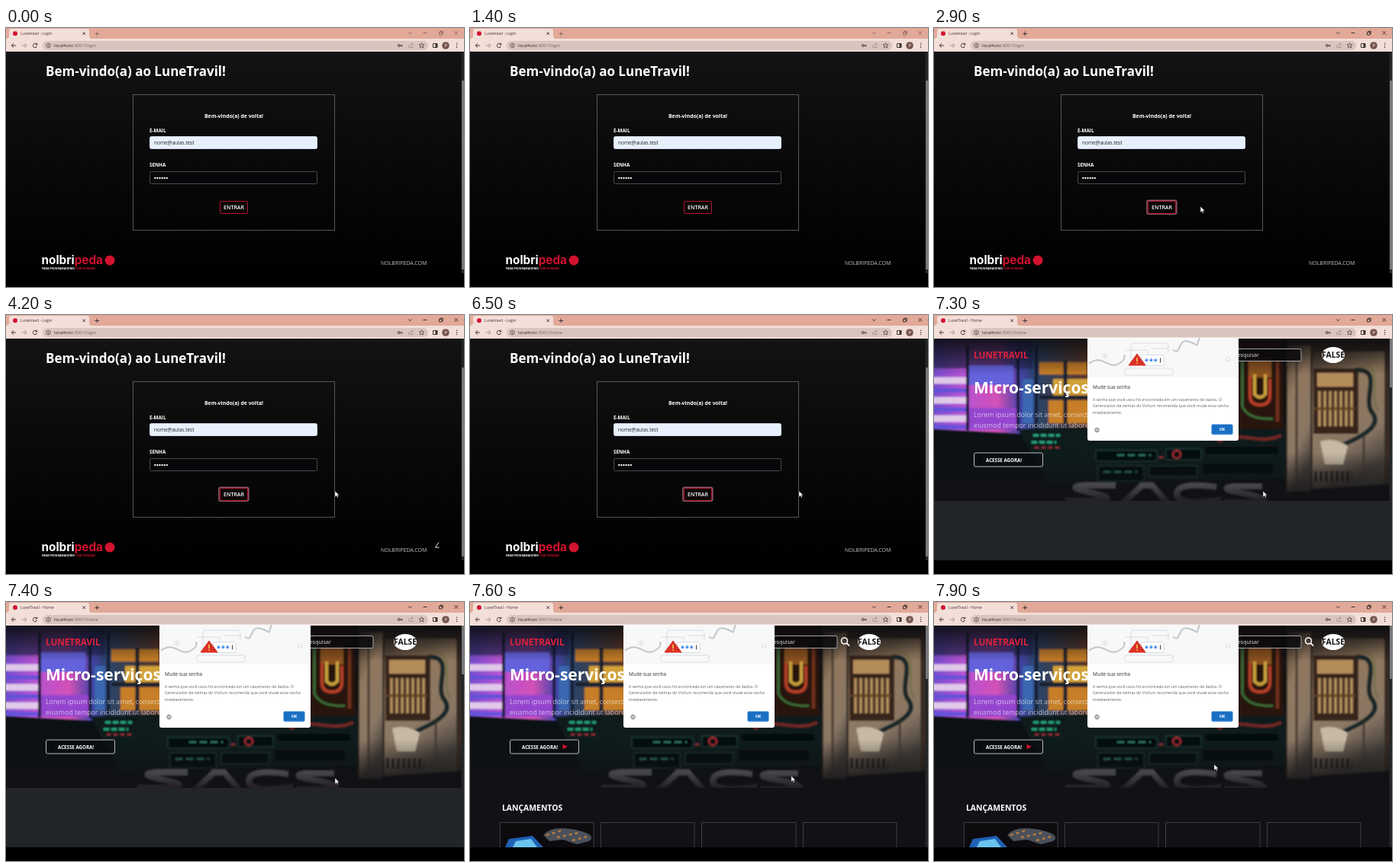
Animation of 600x340 px, one loop 8 s. Source, as an HTML page:

```html
<!DOCTYPE html>
<html lang="pt">
<head>
<meta charset="utf-8">
<title>Login</title>
<style>
  html, body { margin: 0; width: 100%; height: 100%; overflow: hidden; background: #000; }
  svg { display: block; width: 600px; height: 340px; }
  text { font-family: "Open Sans", "Noto Sans", sans-serif; fill: #fff; }
  .bold { font-weight: 700; }
  .mid { text-anchor: middle; }
  .line { fill: none; stroke: #3c3331; stroke-width: 1; }
  .art { fill: none; stroke: #dadce0; stroke-width: 1; }
  .cable { fill: none; stroke-width: 4; }
  .note { font-size: 5.2px; fill: #5f6368; }
</style>
</head>
<body>
<svg viewBox="0 0 600 340">
  <defs>
    <linearGradient id="night" x2="0" y2="1">
      <stop stop-color="#131315"/><stop offset=".45" stop-color="#0a0a0b"/><stop offset="1" stop-color="#000"/>
    </linearGradient>
    <linearGradient id="neon">
      <stop stop-color="#7a52e0"/><stop offset=".2" stop-color="#c75be8"/><stop offset=".42" stop-color="#e658c8"/>
      <stop offset=".56" stop-color="#4b48b8"/><stop offset=".66" stop-color="#2c4a72"/><stop offset="1" stop-color="#6b3a28"/>
    </linearGradient>
    <linearGradient id="metal" x2=".3" y2="1">
      <stop stop-color="#4a3a30"/><stop offset=".35" stop-color="#a08468"/><stop offset=".75" stop-color="#94806c"/><stop offset="1" stop-color="#4b443f"/>
    </linearGradient>
    <linearGradient id="shade" x2="0" y2="1">
      <stop stop-color="#08090b" stop-opacity=".85"/><stop offset=".22" stop-color="#08090b" stop-opacity=".1"/>
      <stop offset=".7" stop-color="#111214" stop-opacity=".08"/><stop offset="1" stop-color="#131115" stop-opacity=".9"/>
    </linearGradient>
    <filter id="slight" x="-5%" y="-5%" width="110%" height="110%"><feGaussianBlur stdDeviation="1"/></filter>
    <clipPath id="heroClip"><rect y="31" width="600" height="213"/></clipPath>
    <clipPath id="pageClip"><rect y="31" width="600" height="291"/></clipPath>
  </defs>

  <g id="login">
    <rect y="31" width="600" height="291" fill="url(#night)"/>
    <text class="bold" x="52" y="63" font-size="17">Bem-vindo(a) ao LuneTravil!</text>
    <rect x="166.5" y="87.5" width="264" height="178" fill="none" stroke="#55565a"/>
    <text class="bold mid" x="298.5" y="118" font-size="6.9">Bem-vindo(a) de volta!</text>
    <text class="bold" x="188" y="136.5" font-size="6.3">E-MAIL</text>
    <rect x="188.5" y="142.5" width="219" height="16" rx="2" fill="#e8f0fe" stroke="#cdd5e4"/>
    <text x="194" y="153" font-size="6.5" style="fill:#222">nome@aulas.test</text>
    <text class="bold" x="188" y="182" font-size="6.3">SENHA</text>
    <rect x="188.5" y="188.5" width="219" height="16" rx="2" fill="#08080a" stroke="#4a4b50"/>
    <path d="M195.3 197H213" stroke="#fff" stroke-width="2.3" stroke-linecap="round" stroke-dasharray="0 3.1"/>
    <rect id="focusRing" x="278.8" y="226.3" width="39" height="18" rx="2.5" fill="none" stroke="#8c5a66" stroke-width="1.5"/>
    <rect x="280.5" y="227.5" width="36" height="16" rx="1.5" fill="#0b0608" stroke="#b3152f"/>
    <text class="mid" x="298.5" y="238" font-size="7" font-weight="600">ENTRAR</text>
    <text class="bold" x="46.5" y="310" font-size="15.3" style="font-family:Inter,sans-serif">nolbri<tspan fill="#d3122f">peda</tspan></text>
    <circle cx="136" cy="305" r="6.5" fill="#d3122f"/>
    <text class="bold" x="47" y="316.5" font-size="3.6">PARA PROGRAMADORES <tspan fill="#d3122f">COM OUSADIA</tspan></text>
    <text x="491" y="310.5" font-size="7" style="fill:#c4c4c6">NOLBRIPEDA.COM</text>
    <rect x="596.5" y="31" width="3.5" height="291" fill="#242527"/>
    <rect x="597" y="69" width="3" height="248" fill="#77787b"/>
    <g id="building"><path d="M567 298.5L562.5 305.2H571.3Z" fill="none" stroke="#fff" stroke-width=".9" pathLength="100" stroke-dasharray="100"/></g>
  </g>

  <g id="loading">
    <rect y="31" width="600" height="291" fill="#212529"/>
    <path id="spinner" d="M303.6 172.4A6.4 6.4 0 1 0 303.6 181.6" fill="none" stroke="#fff" stroke-width="1.8"/>
  </g>

  <g id="home" clip-path="url(#pageClip)">
    <rect y="31" width="600" height="291" fill="#212529"/>
    <g clip-path="url(#heroClip)">
      <rect y="31" width="600" height="213" fill="#0b1114"/>
      <g filter="url(#slight)">
        <!-- neon rack -->
        <path d="M-5 31H205V148L110 156L-5 150Z" fill="url(#neon)"/>
        <path d="M-5 31H130V70H-5Z" fill="#262a5c" opacity=".65"/>
        <path d="M-5 86H42M-5 112H42M-5 136H42" stroke="#f6dcff" stroke-width="9"/>
        <path d="M-5 99H42M-5 124H42M-5 147H42" stroke="#6a58ee" stroke-width="5"/>
        <path d="M46 66H104V92H46Z" fill="#6d6cf2"/>
        <path d="M46 122H108V150H46Z" fill="#a14be0"/>
        <path d="M44 40V152M110 45V152M134 40V150" stroke="#191a38" stroke-width="4"/>
        <path d="M138 62H200V78H138ZM150 112H205V142H150Z" fill="#d98a2c"/>
        <path d="M156 84H205V106H156Z" fill="#e8b23c"/>
        <path d="M116 84H130V142H116Z" fill="#3f6fc0"/>
        <path d="M138 108H205M172 60V148" stroke="#1d2331" stroke-width="5"/>
        <!-- board slots -->
        <path d="M110 150L460 140V215L150 222Z" fill="#0d1a1e"/>
        <path d="M130 158H165M128 167H160" stroke="#2fc18e" stroke-width="3" stroke-dasharray="7 3"/>
        <path d="M132 174H168M250 187H330" stroke="#a8343c" stroke-width="2" stroke-dasharray="5 4"/>
        <path d="M212 178H292V192H212ZM215 198H275V218H215ZM282 198H345V212H282ZM304 176H350V190H304Z" fill="#05080a" stroke="#28564d"/>
        <path d="M222 206H266M240 184H284" stroke="#35896f" stroke-width="2" stroke-dasharray="9 5"/>
        <circle cx="318" cy="183" r="5" fill="none" stroke="#c23540" stroke-width="2"/>
        <path d="M355 172H452V184H355ZM352 194H445V210H352Z" fill="#05070a" stroke="#252c30"/>
        <path class="cable" d="M372 166C400 150 425 172 455 158" stroke="#7c2c28"/>
        <!-- loose cables -->
        <path d="M396 31H458V150H396Z" fill="#29140f"/>
        <path d="M412 58H442V82H412Z" fill="#9a5a20"/>
        <path class="cable" d="M414 80V106Q414 118 427 118T440 106V84" stroke="#c8452a"/>
        <path class="cable" d="M420 78V104Q427 112 434 104V78" stroke="#e0b043"/>
        <path class="cable" d="M404 50V120Q412 138 444 136" stroke="#3f7a3c" style="stroke-width:3"/>
        <path class="cable" d="M450 60V140" stroke="#7b351f"/>
        <!-- metal case -->
        <path d="M461 31H600V222L461 232Z" fill="#3a2e28"/>
        <path d="M463 40H493V232H463Z" fill="url(#metal)"/>
        <path d="M496 48H590V222L496 228Z" fill="url(#metal)"/>
        <path d="M497 70H556V156H497Z" fill="#3b281b"/>
        <path d="M502 76H549V94H502Z" fill="#c79a63"/>
        <path d="M505 100V146M512 100V146M519 100V146M526 100V146M533 100V146M540 100V146M547 100V146" stroke="#c9a06a" stroke-width="3.5"/>
        <path d="M498 123H552" stroke="#6a4524" stroke-width="3"/>
        <path class="cable" d="M552 72C590 70 560 110 574 128S560 160 532 172" stroke="#1d2b2b" style="stroke-width:6"/>
        <path class="cable" d="M558 66C592 64 568 108 582 126" stroke="#75794a" style="stroke-width:2"/>
        <path d="M506 166Q524 160 542 172L536 196H512Z" fill="#d8c8b2"/>
        <path d="M498 212H548" stroke="#2c2724" stroke-width="14" stroke-dasharray="4 3"/>
        <path d="M475 50V222M563 160V215" stroke="#4d4036" stroke-width="3"/>
        <!-- floor lettering, flattened by perspective -->
        <path d="M238 224H198Q170 226 204 233T222 244H172M248 247L272 224H286L306 247M370 226Q318 219 318 235T376 243M430 225H392Q370 228 404 234T432 246H380" fill="none" stroke="#a3a3a5" stroke-width="8"/>
      </g>
      <rect y="31" width="600" height="213" fill="url(#shade)"/>
    </g>
    <text class="bold" x="52" y="57" font-size="11.7" style="fill:#e0203a">LUNETRAVIL</text>
    <text class="bold" x="52" y="103" font-size="21">Micro-serviços</text>
    <g font-size="8.8" opacity=".65">
      <text x="52" y="134">Lorem ipsum dolor sit amet, consect</text>
      <text x="52" y="148">eiusmod tempor incididunt ut labore</text>
    </g>
    <rect x="52.5" y="181" width="90" height="18" rx="2" fill="#090a0c" fill-opacity=".6" stroke="#d0d0d2" stroke-width=".9"/>
    <text class="bold" x="68" y="192.6" font-size="6.2">ACESSE AGORA!</text>
    <rect x="380.5" y="44.5" width="100.5" height="16" rx="2" fill="#0a0a0c" fill-opacity=".8" stroke="#b4b4b8" stroke-width=".9"/>
    <text x="393.5" y="55" font-size="7.1" style="fill:#ddd">Pesquisar</text>
    <ellipse cx="523" cy="52.5" rx="15" ry="10.5" fill="#fff"/>
    <text class="bold mid" x="523" y="56.3" font-size="10.3" style="fill:#101113">FALSE</text>
    <g id="icons">
      <path d="M121.5 186.8L128 190L121.5 193.2Z" fill="#d3122f"/>
      <circle cx="490.5" cy="51" r="4" fill="none" stroke="#fff" stroke-width="1.6"/>
      <path d="M493.4 54L497 57.6" stroke="#fff" stroke-width="1.8"/>
    </g>
    <g id="releases">
      <rect y="244" width="600" height="78" fill="#131115"/>
      <text class="bold" x="42" y="274" font-size="10.4">LANÇAMENTOS</text>
      <path d="M40 290H162V322H40Z" fill="#0d0b0e"/>
      <path d="M46 322L51 311L82 307L96 322Z" fill="#1f62b4"/>
      <path d="M56 322L60 314L80 311L88 322Z" fill="#69c3ee"/>
      <path d="M96 306Q104 296 122 297T152 303T156 314L140 318L122 312L104 314Z" fill="#4a505a"/>
      <path d="M100 306L120 300M114 309L142 303M134 313L153 308" stroke="#b5793f" stroke-width="2.5" stroke-dasharray="4 4"/>
      <path d="M39.5 330V289.5H162V330M171.5 330V289.5H294V330M303.5 330V289.5H427V330M436.5 330V289.5H559V330" fill="none" stroke="#3e3d41"/>
    </g>
    <rect x="596.5" y="31" width="3.5" height="291" fill="#242527"/>
    <rect id="thumb" x="597" y="31" width="3" fill="#77787b"/>
  </g>

  <g id="browser">
    <rect width="600" height="16" fill="#e2a898"/>
    <path d="M0 14Q4 14 4 10V4Q4 1 7 1H106Q109 1 109 4V10Q109 14 113 14H600V31H0Z" fill="#f3ded8"/>
    <circle cx="12" cy="7.3" r="3" fill="#d3122f"/>
    <text id="tabTitle" x="19" y="9.4" font-size="5.2" style="fill:#3c3331"></text>
    <path class="line" d="M100.5 5.5L104 9M104 5.5L100.5 9"/>
    <path id="windowIcons" class="line" d="M116.5 7.5H122M119.2 4.7V10.2M527 5.5L529.2 7.8L531.4 5.5M546.5 6.5H551.5M567.5 5.5H571V9H567.5ZM568.8 5.3V4.2H572.3V7.7H571M587.5 4.2L592 8.7M592 4.2L587.5 8.7"/>
    <path class="line" d="M13 23H7.5M10 20.2L7.2 23L10 25.8"/>
    <path class="line" d="M21 23H26.5M24 20.2L26.8 23L24 25.8" style="stroke:#a9958f"/>
    <path class="line" d="M40 21.2A2.7 2.7 0 1 0 40.6 23.8M40.7 19.8V22H38.5"/>
    <rect x="48" y="17" width="505" height="12" rx="6" fill="#d9c4be"/>
    <circle class="line" cx="55.5" cy="23" r="2.7" style="stroke-width:.7"/>
    <path class="line" d="M55.5 22.6V24.6M55.5 21.2V21.9" style="stroke-width:.8"/>
    <text x="63" y="25.1" font-size="5.9" style="fill:#2c2624">localhost<tspan fill="#75655f">:3001/<tspan id="route"></tspan></tspan></text>
    <circle class="line" cx="514.8" cy="23" r="1.4"/>
    <path class="line" d="M516.2 23H519.5M518.6 23V24.6"/>
    <path class="line" d="M528 22V25.5H533V23.5M529.5 23.5Q530 21 533 20.8M531.6 19.5L533.2 20.8L531.6 22.2" style="stroke:#95827c;stroke-width:.7"/>
    <path class="line" d="M544.5 19.8L545.5 22H547.8L546 23.6L546.7 26L544.5 24.7L542.3 26L543 23.6L541.2 22H543.5Z" style="stroke-width:.7"/>
    <path class="line" d="M559.5 20.5H565V25.5H559.5Z"/>
    <rect x="562.5" y="20.5" width="2.5" height="5" fill="#3c3331"/>
    <circle cx="576" cy="23" r="4.8" fill="#77564d"/>
    <text class="mid" x="576" y="25" font-size="5.4">P</text>
    <path d="M590.5 20.3V26" stroke="#3c3331" stroke-width="1.5" stroke-linecap="round" stroke-dasharray="0 2.6"/>
  </g>

  <g id="dialog">
    <path d="M201 30H399V162Q399 165 396 165H204Q201 165 201 162Z" fill="#fff"/>
    <path d="M201 30H399V82H201Z" fill="#f8f8f9"/>
    <path class="art" d="M203 64C220 50 228 72 242 64S245 52 251 54" style="stroke:#c4c6ca;stroke-width:2"/>
    <path class="art" d="M313 46C325 54 318 30 334 35S342 44 348 30" style="stroke:#c4c6ca;stroke-width:2"/>
    <path class="art" d="M258 70V40Q258 37 261 37H304Q307 37 307 40V50M251 46H280V55M250 77V70H313V77Q313 79 310 79H253Q250 79 250 77M285 44H307"/>
    <path class="art" d="M224 49V58M220 51L228 56M228 51L220 56M382 58Q383 54 386 56Q389 57 388 60H382Z"/>
    <rect class="art" x="271.5" y="52.5" width="30" height="14" rx="2" style="fill:#fff"/>
    <path d="M266 51L277 66H255Z" fill="#d93025" stroke="#d93025" stroke-linejoin="round"/>
    <path d="M266 56V61M266 62.6V64" stroke="#fdd663" stroke-width="1.5"/>
    <text class="bold" x="276" y="64" font-size="9" style="fill:#1a73e8" letter-spacing="1">***</text>
    <path d="M296.5 56.5V62.5" stroke="#3c4043"/>
    <text x="208" y="97" font-size="6.4" style="fill:#303134">Mude sua senha</text>
    <text class="note" x="208" y="112.5">A senha que você usou foi encontrada em um vazamento de dados. O</text>
    <text class="note" x="208" y="121.3">Gerenciador de senhas do Vorlum recomenda que você mude essa senha</text>
    <text class="note" x="208" y="130">imediatamente.</text>
    <circle class="line" cx="213.5" cy="151" r="2.6" style="stroke-width:.8"/>
    <path class="line" d="M213.5 150.6V152.6M213.5 149.2V149.9" style="stroke-width:.8"/>
    <rect x="363.5" y="143.5" width="28" height="13.5" rx="2" fill="#1a6fc4" stroke="#8ebcec"/>
    <text class="mid bold" x="377.5" y="152.2" font-size="5.3">OK</text>
  </g>

  <rect y="322" width="600" height="18" fill="#000"/>
  <path id="cursor" d="M0 0V8L1.9 6.2L3.2 8.8L4.4 8.2L3.2 5.8H5.6Z" fill="#fff" stroke="#111" stroke-width=".4"/>
</svg>
<script>
const LOOP = 8000;
const pointer = [[1700, 560, 236], [2200, 304, 236], [2700, 304, 236], [3200, 431, 231], [7500, 431, 231], [7900, 367, 213]];
const el = id => document.getElementById(id);
const show = (id, on) => el(id).style.display = on ? "" : "none";
const ramp = (t, from, to) => Math.min(1, Math.max(0, (t - from) / (to - from)));
const smooth = p => p * p * (3 - 2 * p);

function pointerAt(t) {
  let [, x, y] = pointer[0];
  for (let i = 1; i < pointer.length; i++) {
    const [from, x0, y0] = pointer[i - 1], [to, x1, y1] = pointer[i];
    const p = smooth(ramp(t, from, to));
    if (t >= from) { x = x0 + (x1 - x0) * p; y = y0 + (y1 - y0) * p; }
  }
  return `translate(${x} ${y})`;
}

function draw(t) {
  const home = t >= 7200, loading = t >= 6600 && !home, listed = t >= 7600;
  show("login", t < 6600);
  show("loading", loading);
  show("home", home);
  show("dialog", t >= 7300);
  show("icons", t >= 7500);
  show("releases", listed);
  show("focusRing", t >= 2400);
  show("cursor", t >= 1700);
  el("thumb").setAttribute("height", listed ? 70 : 64);
  el("cursor").setAttribute("transform", pointerAt(t));
  el("windowIcons").setAttribute("opacity", t < 2400 ? .5 : 1);
  el("tabTitle").textContent = home ? "LuneTravil - Home" : "Lunetravil - Login";
  el("route").textContent = t < 6300 ? "login" : "home";

  // Build indicator slides in, traces its outline, then slides out.
  const visible = ramp(t, 3850, 3950) - ramp(t, 5100, 5200);
  const trace = smooth(((t + 320) % 1000) / 1000);
  el("building").setAttribute("opacity", visible);
  el("building").setAttribute("transform", `translate(0 ${4 * (1 - visible)})`);
  el("building").firstElementChild.setAttribute("stroke-dashoffset", 100 * (1 - trace));
  el("spinner").setAttribute("transform", `rotate(${(t - 6600) * 360 / 750} 299.3 177)`);
}

const start = performance.now();
function tick() {
  draw((performance.now() - start) % LOOP);
  requestAnimationFrame(tick);
}
tick();
</script>
</body>
</html>
```
